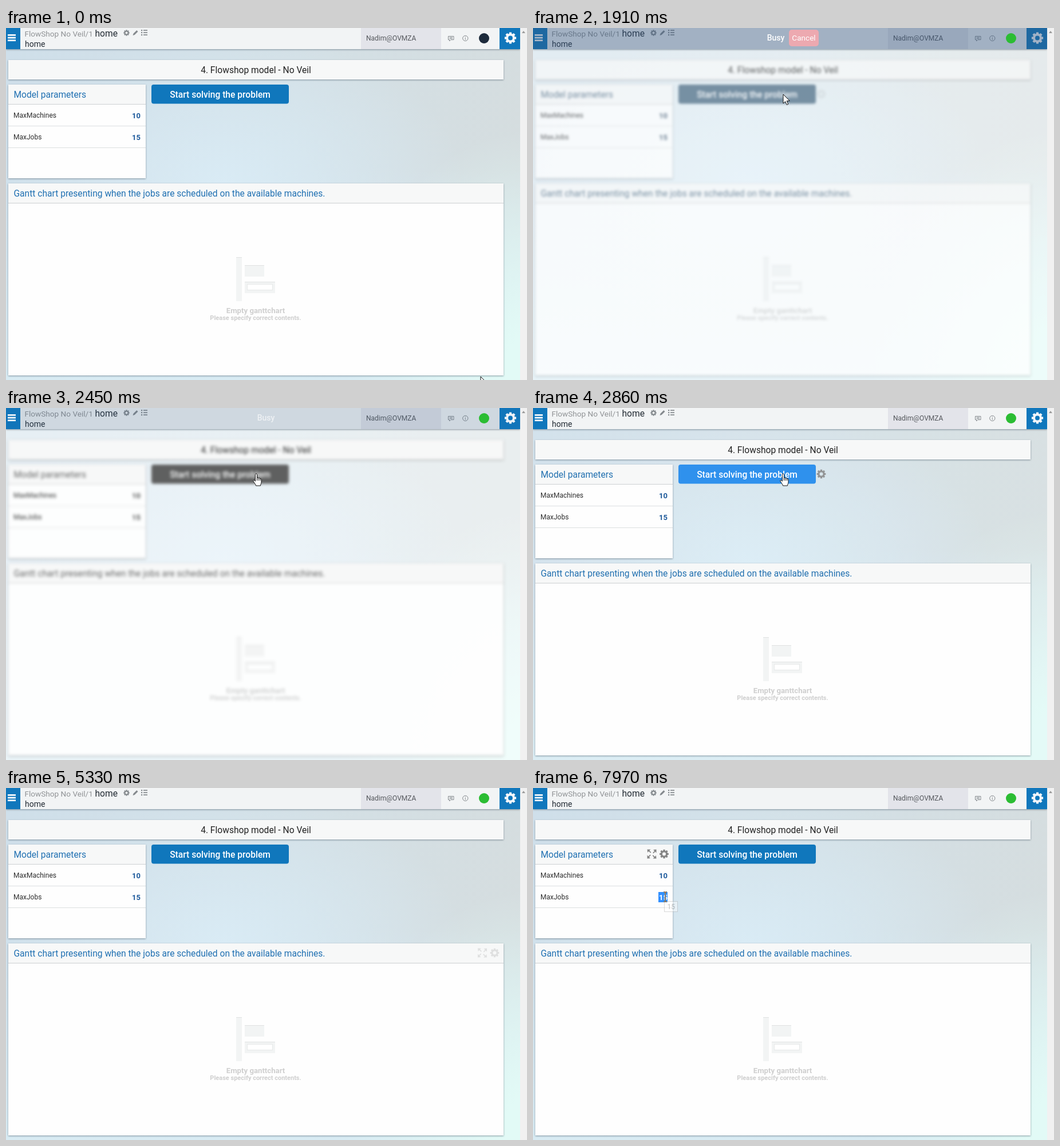
An HTML page for the animation above (8 s loop, 910x616 px).

```html
<!DOCTYPE html>
<html lang="en">
<head>
<meta charset="utf-8">
<title>Flowshop model</title>
<style>
  html, body { margin: 0; width: 100%; height: 100%; overflow: hidden; }
  body {
    background:
      radial-gradient(ellipse 330px 420px at 920px 600px, #e2faf6 15%, #e2faf600),
      radial-gradient(ellipse 420px 260px at 380px 270px, #d9ebf5, #d9ebf500),
      linear-gradient(#cfdade00 40%, #d8ebf3),
      linear-gradient(90deg, #cfdfea, #d3e0e6 55%, #d5dddf);
  }
  svg { position: absolute; left: 0; top: 0; display: block; }
  text { font-family: Roboto, Arial, sans-serif; white-space: pre; }
  .mid { text-anchor: middle; }
  .head { font-size: 15.6px; fill: #1f70b2; }
  .cell { font-size: 12px; fill: #2c2c2c; }
  .value { font-size: 13px; font-weight: 700; fill: #1d5a9c; text-anchor: end; }
  .hint { font-weight: 700; fill: #cfcfcf; text-anchor: middle; }
  .panel { filter: drop-shadow(0 1px 1.5px rgba(40, 60, 75, .5)); }
  .shade { fill: rgb(50, 85, 125); }
  #beam { mix-blend-mode: difference; }
</style>
</head>
<body>
<script>
const LOOP = 8000;
const FRAME = 75;
const BLUE = [16, 119, 188], HOVER = [51, 153, 255], PRESSED = [14, 102, 163];
const rgb = c => `rgb(${c.map(Math.round)})`;

const rect = (x, y, w, h, fill, more = '') =>
  `<rect x="${x}" y="${y}" width="${w}" height="${h}" fill="${fill}" ${more}/>`;
const text = (x, y, str, more = '') => `<text x="${x}" y="${y}" ${more}>${str}</text>`;
const path = (d, more) => `<path d="${d}" ${more}/>`;

function gear(x, y, r, fill) {
  const pts = [];
  for (let i = 0; i < 8; i++) {
    for (const [off, k] of [[-.29, .76], [-.2, 1], [.2, 1], [.29, .76]]) {
      const a = i * Math.PI / 4 + off;
      pts.push((x + r * k * Math.cos(a)).toFixed(2) + ' ' + (y + r * k * Math.sin(a)).toFixed(2));
    }
  }
  const h = r * .38;
  const hole = `M${x - h} ${y}a${h} ${h} 0 1 0 ${2 * h} 0a${h} ${h} 0 1 0 ${-2 * h} 0Z`;
  return path(`M${pts.join('L')}Z${hole}`, `fill="${fill}" fill-rule="evenodd"`);
}

function expand(x, y, fill) {
  const arm = 'M-8-8h6l-2.1 2.1 3 3-1.2 1.2-3-3-2.1 2.1Z';
  return `<g transform="translate(${x} ${y})">` + [0, 90, 180, 270].map(a =>
    path(arm, `fill="${fill}" transform="rotate(${a})"`)).join('') + '</g>';
}

const tools = (id, x, y) =>
  `<g id="${id}">${expand(x, y, '#858585')}${gear(x + 21.5, y, 8, '#858585')}</g>`;

const panel = (x, y, w, h) => `<g class="panel">${rect(x, y, w, h, '#fefefe')}</g>`;
const panelHead = (x, y, w, title) =>
  rect(x, y, w, 34, '#f7f8f8') + rect(x, y + 34, w, 1, '#cdd0d2') +
  text(x + 9.5, y + 23, title, 'class="head"');

const emptyBar = (x, y, w, h) => rect(x, y, w, h, '#f2f4f4') + rect(x, y, w, 1, '#e0e2e2');
const emptyChart =
  emptyBar(402, 401, 10, 77) + emptyBar(417, 415, 34, 20) + emptyBar(417, 444, 53, 20) +
  rect(421.5, 448.5, 44, 10, '#fff', 'stroke="#e6e8e8"') +
  text(436, 499, 'Empty ganttchart', 'class="hint" font-size="13.2"') +
  text(436, 511, 'Please specify correct contents.', 'class="hint" font-size="11"');

const widgets =
  panel(4, 56, 865, 34) + rect(4, 56, 865, 33, '#f7f8f8') +
  text(436.5, 79, '4. Flowshop model - No Veil', 'class="mid" font-size="15.6" fill="#222"') +
  panel(4, 99, 240, 164) + panelHead(4, 99, 240, 'Model parameters') +
  rect(4, 171, 240, 1, '#dcdfe0') + rect(4, 209, 240, 1, '#dcdfe0') +
  text(13, 157, 'MaxMachines', 'class="cell"') + text(235, 157.5, '10', 'class="value"') +
  text(13, 195, 'MaxJobs', 'class="cell"') +
  rect(219, 182, 16, 18, '#3390ff', 'id="mark"') +
  text(235, 195.5, '15', 'class="value" id="jobs"') +
  tools('paramTools', 207.5, 115.5) +
  panel(4, 272, 865, 336) +
  panelHead(4, 272, 865, 'Gantt chart presenting when the jobs are scheduled on the available machines.') +
  tools('ganttTools', 832, 288.5) + emptyChart;

const button =
  rect(254, 99, 240, 33.5, rgb(BLUE), 'rx="4" id="face"') +
  text(374, 122, 'Start solving the problem', 'class="mid" font-size="15.6" font-weight="500" fill="#fff"') +
  `<g id="buttonGear">${gear(503.5, 115.5, 8, '#858585')}</g>`;

const grey = 'fill="none" stroke="#858a8e"';
const header =
  `<g class="panel">${rect(0, 0, 898, 37, '#f2f4f5')}</g>` +
  rect(620, 0, 140, 37, '#e3e4ea') +
  rect(0, 0, 25, 37, rgb(BLUE)) + rect(862, 0, 36, 37, rgb(BLUE)) +
  [11, 15.7, 20.4].map(y => rect(3, y, 14, 2.7, '#fff')).join('') +
  text(32.5, 14.5, 'FlowShop No Veil/1', 'font-size="13.6" fill="#909396"') +
  text(155.5, 14.5, 'home', 'font-size="15.6" fill="#222a33"') +
  text(33, 33, 'home', 'font-size="14" fill="#222a33"') +
  gear(210.5, 8.5, 5.3, '#858a8e') +
  path('M221.5 13l1-3.2 5.8-5.8 2.2 2.2-5.8 5.8Z', 'fill="#858a8e"') +
  [4, 8, 12].map(y => rect(236, y - 1, 2.2, 2.2, '#858a8e') + rect(240, y - .8, 7, 1.7, '#858a8e')).join('') +
  text(629, 22, 'Nadim@OVMZA', 'font-size="12" fill="#55585d"') +
  path('M772.5 14.5h9.5v6h-5l-2.5 2.5v-2.5h-2Z', grey) + path('M774.5 16.5h5.5m-5.5 2h5.5', grey) +
  `<circle cx="802.3" cy="18" r="4.6" ${grey}/>` + path('M802.3 17.3v3.4m0-5.6v1.2', grey) +
  gear(881, 17.5, 10.3, '#f2f6fa') +
  path('M25 0H862V37H25Z', 'class="shade" id="barShade"') +
  path('M0 0H25V37H0ZM862 0H898V37H862Z', 'class="shade" id="edgeShade"') +
  '<circle id="badge" cx="835" cy="18" r="9"/>' +
  text(454, 22, 'Busy', 'id="busy" class="mid" font-size="14" font-weight="500" fill="#fff"') +
  `<g id="cancel">${rect(447, 3, 52, 29, '#eda9b0', 'rx="5"')}` +
  text(473, 22, 'Cancel', 'class="mid" font-size="13.6" fill="#fff"') + '</g>' +
  rect(898, 0, 12, 616, '#f1f1f1') + path('M901 9l3-4 3 4Z', 'fill="#9a9a9a"');

const ink = 'fill="#fff" stroke="#111" stroke-linejoin="round"';
const pointers =
  path('M0 0V16L3.7 12.6 6.2 18.4 8.8 17.3 6.3 11.6H11.3Z', `id="arrow" ${ink}`) +
  `<g id="hand">${path('M-1.6.5C-1.6-1.4 1.5-1.4 1.5.5V7C1.6 5.6 4.2 5.6 4.2 7.2 4.4 6 6.8 6.2 6.8 8 ' +
    '7 7 9 7.3 9 9V14C9 16 7.5 17.5 7.5 20H-.5C-.5 18-4 14.5-5 12-5.8 10.5-3.8 9.5-2.8 10.8L-1.6 12.2Z', ink)}` +
  path('M1.5 7v4M4.2 7.2v4M6.8 8v3', 'stroke="#111"') + '</g>' +
  path('M-3-8.5h2.2L0-7.7.8-8.5H3M0-7.7V7.7M-3 8.5h2.2L0 7.7.8 8.5H3',
    'id="beam" fill="none" stroke="#fff" stroke-width="1.2"');

document.body.innerHTML =
  `<svg width="910" height="616" viewBox="0 0 910 616">
    ${rect(0, 37, 898, 579, '#fff', 'id="veil"')}
    <g id="widgets">${widgets}</g><g id="button">${button}</g>${header}
    <g id="tip">${rect(229.5, 198.5, 23, 18, '#fff', 'stroke="#aaa"')}
      ${text(234.5, 211.5, '15', 'font-size="12" fill="#777"')}</g>
    ${pointers}
  </svg>`;

const el = {};
document.querySelectorAll('[id]').forEach(e => el[e.id] = e);
const fade = (name, v) => el[name].style.opacity = v;

const ramp = (t, from, to) => Math.min(1, Math.max(0, (t - from) / (to - from)));
const mix = (a, b, p) => a.map((v, i) => v + (b[i] - v) * p);
const smooth = p => p * p * (3 - 2 * p);

// Pointer moves: start, end, place reached
const HOME = [829, 610];
const MOVES = [
  [0, 825, 437, 116], [3540, 3970, 682, 114], [4420, 5250, 873, 600], [5250, 5325, 873, 640],
  [5850, 5925, 863, 575], [5925, 6700, 387, 251], [6700, 7340, 231, 190.5]
];
const pointer = t => MOVES.reduce(
  (at, [from, to, ...place]) => mix(at, place, smooth(ramp(t, from, to))), HOME);

const zone = (x, y, w, h) => ([px, py]) => px > x && px < x + w && py > y && py < y + h;
const onButton = zone(254, 99, 240, 34);
const onParams = zone(4, 99, 240, 164);
const onValue = zone(212, 172, 28, 37);
const onGantt = zone(4, 272, 865, 336);

// Share of the last 200 ms that the pointer spent inside
function linger(t, inside) {
  let hits = 0;
  for (let k = 0; k < 10; k++) hits += inside(pointer(t - 20 * k));
  return hits / 10;
}

function draw(now) {
  const t = Math.floor(now % LOOP / FRAME) * FRAME;

  const cover = ramp(t, 1725, 1912) * (1 - ramp(t, 2475, 2925));
  const busy = ramp(t, 1725, 1875) * (1 - ramp(t, 2313, 2463));
  const waiting = t >= 1800 && t < 2325;
  const haze = cover
    ? `blur(${2.6 * cover}px) grayscale(${cover ** 2}) opacity(${1 - .3 * busy ** 2})` : 'none';
  el.widgets.style.filter = el.button.style.filter = haze;
  fade('veil', .48 * cover);
  fade('barShade', .42 * busy);
  fade('edgeShade', .42 * busy ** 3);
  fade('busy', Math.sqrt(busy));
  fade('cancel', waiting ? busy : 0);
  el.busy.setAttribute('x', waiting ? 424 : 454);
  el.badge.style.fill = t < 1770 ? '#1d2b3c' : '#2bbd33';

  // Hover fades stand still while the pointer is off the page
  const seen = t > 5325 && t < 5925 ? 5325 : t;
  const hover = linger(seen, onButton);
  el.face.style.fill = rgb(mix(mix(BLUE, HOVER, hover), PRESSED, cover));
  fade('buttonGear', hover * (1 - cover));
  fade('ganttTools', linger(seen, onGantt));
  fade('paramTools', linger(seen, onParams));

  const picked = t >= 7750;
  fade('mark', picked ? 1 : 0);
  el.jobs.style.fill = picked ? '#fff' : '';
  fade('tip', ramp(t, 7725, 8250));

  const at = pointer(t);
  const kind = onValue(at) ? 'beam' : onButton(at) && !waiting ? 'hand' : 'arrow';
  for (const name of ['arrow', 'hand', 'beam']) {
    el[name].style.display = name === kind ? '' : 'none';
  }
  el[kind].setAttribute('transform', `translate(${at[0].toFixed(1)} ${at[1].toFixed(1)})`);
}

const start = performance.now();
function tick() {
  draw(performance.now() - start);
  requestAnimationFrame(tick);
}
tick();
</script>
</body>
</html>
```
